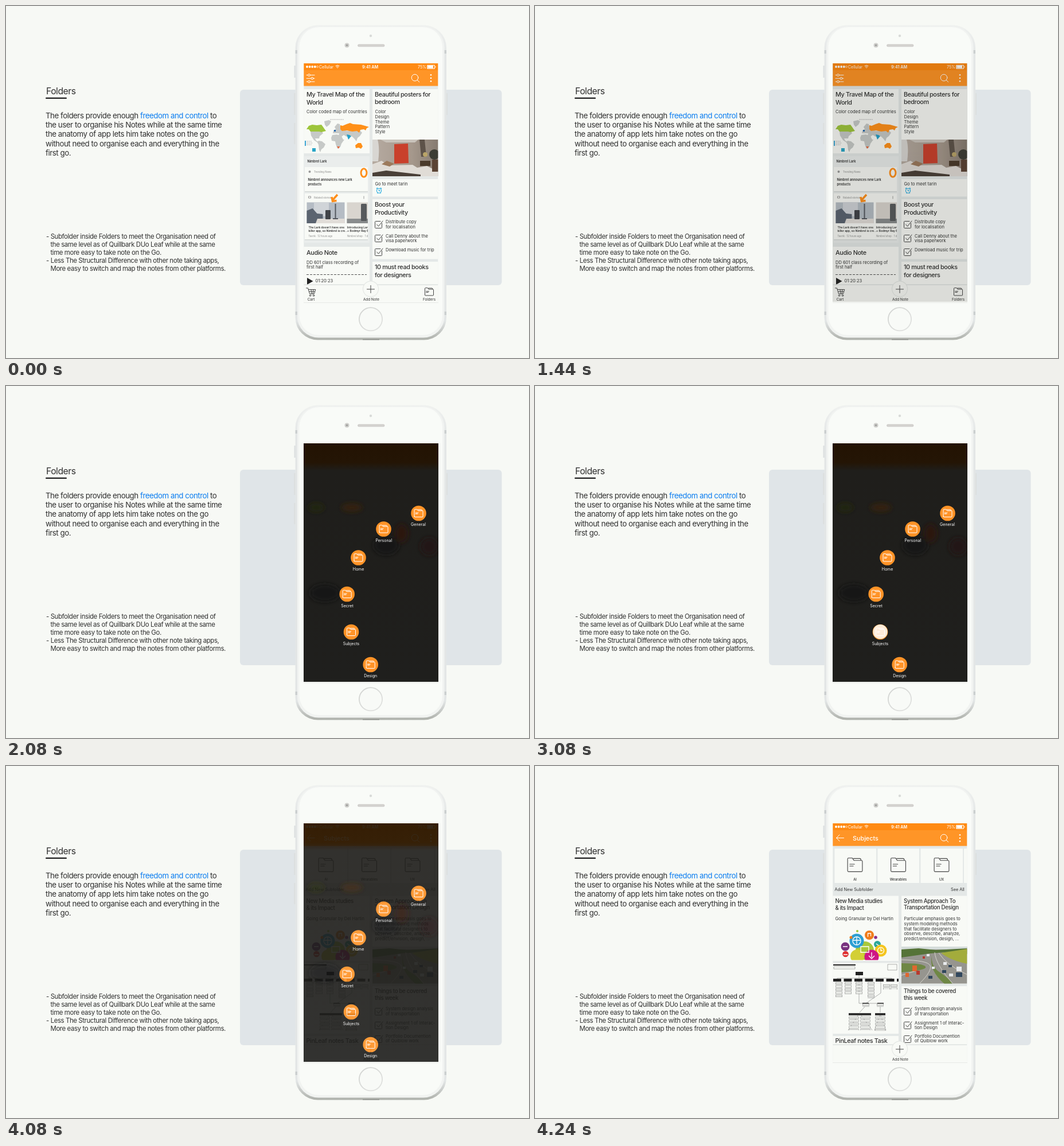
Recreate the animation shown at these times as an HTML page. Size 912 by 614 pixels, loop 4720 ms.

```html
<!DOCTYPE html>
<html lang="en">
<head>
<meta charset="utf-8">
<title>Folders</title>
<style>
  html, body { margin: 0; width: 100%; height: 100%; overflow: hidden; background: #f7f9f5; }
  svg { display: block; width: 912px; height: 614px; }
  text { font-family: Inter, Roboto, sans-serif; fill: #303030; white-space: pre; }
  .title { font-size: 15.7px; letter-spacing: -.03em; }
  .lead { font-size: 13.3px; letter-spacing: -.035em; }
  .points { font-size: 11.42px; letter-spacing: -.035em; }
  .h { font-size: 10.8px; font-weight: 500; letter-spacing: -.035em; }
  .h2 { font-size: 9.7px; font-weight: 500; letter-spacing: -.035em; }
  .s { font-size: 7.5px; }
  .xs { font-size: 6.3px; text-anchor: middle; }
  .sub { font-size: 5.8px; font-weight: 500; }
  .clip { font-size: 5.5px; font-weight: 600; }
  .small { font-size: 4.9px; }
  .tiny { font-size: 4.3px; fill: #888; }
  .white text, text.white { fill: #fff; }
  .label { font-size: 7px; text-anchor: middle; fill: #fff; }
  .card { fill: #f8faf6; }
  .line { fill: none; stroke: #444; stroke-width: 1; stroke-linecap: round; stroke-linejoin: round; }
  .line.white { stroke: #fff; }
  .big { stroke-width: .65; }

  .notes, .subjects, .dim, .menu, .tap { animation: 4720ms linear infinite; }
  .notes { animation-name: leave; }
  .subjects { animation-name: arrive; }
  .dim { animation-name: dim; }
  .menu { animation-name: menu; }
  .tap { fill: #fff; opacity: 0; }
  .tap.open { animation-name: tap-open; }
  .tap.pick { animation-name: tap-pick; }

  @keyframes leave { 0%, 85.592% { visibility: visible } 85.593%, 100% { visibility: hidden } }
  @keyframes arrive { 0%, 85.592% { visibility: hidden } 85.593%, 100% { visibility: visible } }
  @keyframes dim {
    0%, 29.661% { opacity: 0 }
    30.508% { opacity: .125 }
    32.203% { opacity: .81 }
    33.051% { opacity: 1 }
    85.593% { opacity: 1; animation-timing-function: ease-in-out }
    89.831%, 100% { opacity: 0 }
  }
  @keyframes menu {
    0%, 37.288% { opacity: 0; animation-timing-function: ease-in-out }
    44.068%, 100% { opacity: 1 }
  }
  @keyframes tap-open {
    0%, 8.473% { opacity: 0 }
    8.474%, 12.712% { opacity: .8 }
    24.576%, 100% { opacity: 0 }
  }
  @keyframes tap-pick {
    0%, 65.253% { opacity: 0 }
    65.254% { opacity: .82 }
    82.203%, 100% { opacity: 0 }
  }
</style>
</head>
<body>
<svg viewBox="0 0 912 614">
  <defs>
    <linearGradient id="shell" x2="0" y2="1">
      <stop offset="0" stop-color="#eff1ef"/><stop offset=".1" stop-color="#e3e6e6"/>
      <stop offset=".94" stop-color="#e3e6e6"/><stop offset="1" stop-color="#adb0aa"/>
    </linearGradient>
    <linearGradient id="ring" x2="1" y2="1">
      <stop offset="0" stop-color="#d0d2d0"/><stop offset="1" stop-color="#e2e3e1"/>
    </linearGradient>
    <linearGradient id="night" x2="0" y2="1">
      <stop offset="0" stop-color="#231303"/><stop offset=".08" stop-color="#241505"/>
      <stop offset=".115" stop-color="#1f1e1b"/><stop offset="1" stop-color="#1f1f1d"/>
    </linearGradient>
    <linearGradient id="wall" x2="1">
      <stop offset="0" stop-color="#b5aaa0"/><stop offset=".6" stop-color="#a5988c"/><stop offset="1" stop-color="#857a70"/>
    </linearGradient>
    <filter id="soft"><feGaussianBlur stdDeviation="4"/></filter>
    <clipPath id="screen"><path d="M519.3 100H753.3V516H519.3z"/></clipPath>
    <clipPath id="art"><path d="M519 270H634V338.500H519z"/></clipPath>
    <clipPath id="road"><path d="M639 315H754V379.500H639z"/></clipPath>
    <clipPath id="room"><path d="M639 233H754V297H639z"/></clipPath>
    <clipPath id="clipping"><path d="M521 327H631V408H521z"/></clipPath>

    <path id="folder" d="M-7.500 5.500V-5.800q0-1 1-1h3.700l1.800 2.400h7.500q1 0 1 1V5.500q0 1-1 1h-13q-1 0-1-1zM-1.500-6.300h6.500q1 0 1 1.500M-5.300-.800h4.800M-5.300 1h3.600"/>
    <g id="chip">
      <circle r="13.300" fill="#ff9327"/>
      <use href="#folder" class="line white"/>
    </g>
    <path id="check" class="line" d="M5.500-2V5.500q0 1-1 1H-5.500q-1 0-1-1V-4.500q0-1 1-1H3M-3.500 0L-.5 3.300 7-6"/>
    <path id="columns" d="M546 377v22M565 377v22M586 377v28M530 377v26M613 381v9M626 381v9M577 414v6M602 414v6"/>
    <path id="tables" d="M556 437v24M576 437v24M602 437v24"/>
    <g id="status">
      <path fill="#ff8a12" d="M519 100h235v12H519z"/>
      <path fill="#ff9527" d="M519 112h235v27.500H519z"/>
      <g fill="#fff">
        <circle cx="525" cy="106" r="1.900"/><circle cx="529.600" cy="106" r="1.900"/>
        <circle cx="534.200" cy="106" r="1.900"/><circle cx="538.800" cy="106" r="1.900"/>
        <circle cx="741" cy="120.300" r="1.300"/><circle cx="741" cy="125.800" r="1.300"/><circle cx="741" cy="131.300" r="1.300"/>
        <path d="M735.500 104h9.500v4.500h-9.500z"/>
      </g>
      <circle cx="543" cy="106" r="1.500" fill="none" stroke="#fff" stroke-width=".6"/>
      <g class="line white">
        <path d="M575 104.500q3-2.500 6 0M576.300 106.300q1.700-1.400 3.400 0M578 108v.2"/>
        <circle cx="713" cy="125" r="5.800"/><path d="M717.200 129.200l3.500 3.500M735 103.300h12.500v6H735zM749 105.500v1.500"/>
      </g>
      <g class="white">
        <text x="546" y="108.600" font-size="7">Cellular</text>
        <text x="621" y="108.600" font-size="7.200" font-weight="600">9:41 AM</text>
        <text x="718" y="108.600" font-size="7">75%</text>
      </g>
    </g>
    <g id="dock">
      <path fill="#dfe3e1" d="M519 485.500h235v1.500H519z"/>
      <path class="card" d="M519 487h235v30H519z"/>
      <circle cx="636" cy="493.500" r="14" fill="#e2e5e2"/>
      <circle cx="636" cy="493.500" r="13" class="card"/>
      <path class="line" d="M629.500 494h13M636 487.500v13"/>
      <text class="xs" x="637" y="514">Add Note</text>
    </g>
  </defs>

  <rect x="408" y="146" width="456.500" height="341" rx="6" fill="#e0e5e8"/>

  <text class="title" x="70" y="153.500">Folders</text>
  <path d="M70.300 160.700H104.700" stroke="#303030" stroke-width="2.600" stroke-linecap="round"/>
  <g class="lead">
    <text x="69" y="195.500">The folders provide enough <tspan fill="#0a7df0">freedom and control</tspan> to</text>
    <text x="69" y="212">the user to organise his Notes while at the same time</text>
    <text x="69" y="228.400">the anatomy of app lets him take notes on the go</text>
    <text x="69" y="244.800">without need to organise each and everything in the</text>
    <text x="69" y="261.200">first go.</text>
  </g>
  <g class="points">
    <text x="70" y="405.500">- Subfolder inside Folders to meet the Organisation need of</text>
    <text x="77.500" y="419.500">the same level as of Quillbark DUo Leaf while at the same</text>
    <text x="77.500" y="433.500">time more easy to take note on the Go.</text>
    <text x="70" y="447.500">- Less The Structural Difference with other note taking apps,</text>
    <text x="77.500" y="461.500">More easy to switch and map the notes from other platforms.</text>
  </g>

  <g id="phone">
    <path fill="#dcdfdf" d="M502.500 104h3v21h-3zM502 152h3.500v38H502zM502 204h3.500v37H502zM767 152h3v38h-3z"/>
    <rect x="504.500" y="33.500" width="263.500" height="549" rx="39" fill="url(#shell)"/>
    <path fill="#cbcfcf" d="M504.500 77h4v6h-4zM764 77h4v6h-4zM504.500 533h4v6h-4zM764 533h4v6h-4z"/>
    <rect x="508" y="35.500" width="256.500" height="543" rx="37" fill="#f1f3f1"/>
    <rect x="511.500" y="37" width="249.500" height="537" rx="34" fill="#f9fbf8"/>
    <path fill="#8f918d" d="M622 581h29v1.500h-29z"/>
    <circle cx="636" cy="52" r="2.200" fill="#d9dbd9"/>
    <circle cx="594.500" cy="68.500" r="4" fill="#cfcfcc"/><circle cx="594.500" cy="68.500" r="1.800" fill="#a0a09e"/>
    <rect x="613.500" y="67" width="46.500" height="3.800" rx="1.900" fill="#d5d3d0" stroke="#bfbdba" stroke-width=".6"/>
    <circle cx="636" cy="546.300" r="20.100" fill="#f8faf7" stroke="url(#ring)" stroke-width="1.800"/>
    <path d="M519 517.500H754" stroke="#e6e8e5"/>
  </g>

  <g clip-path="url(#screen)">
    <g class="notes">
      <path fill="#e4e8e7" d="M519 139h235v377H519z"/>
      <path class="card" d="M519 145h115v112H519zM519 420h115v70H519zM639 145h115v152H639zM639 302h115v30.500H639zM639 337h115v104.500H639zM639 446h115v44H639z"/>
      <use href="#status"/>
      <g class="line white">
        <path d="M524 120.500h2.500M530.500 120.500h7.500M524 126.300h8M536 126.300h2M524 132h2.500M530.500 132h7.500"/>
        <circle cx="528.500" cy="120.500" r="1.900"/><circle cx="534" cy="126.300" r="1.900"/><circle cx="528.500" cy="132" r="1.900"/>
      </g>

      <text class="h" x="524" y="158">My Travel Map of the</text>
      <text class="h" x="524" y="171.500">World</text>
      <text class="s" x="524" y="187">Color coded map of countries</text>
      <g id="world">
        <path fill="#c6c9c7" d="M531 219h20l2 3-6 5-1 4-7 0 2 4 4 2-2 1-6-4-5-8zM555 201l8-2 4 2-3 6-5 4-3-4zM545 235l6 1 6 5-3 6-4 3-2 5-2-4-1-9-2-4z"/>
        <path fill="#c6c9c7" d="M569 225l8-1 8 3 3 6 2 0-5 7-2 6-5 3-3-8-1-5-6-1-1-5zM570 222l1-5 4-2-2-4 5-6 4 1 2 9 12 3 20-2 5 5-4 6-4 3-2 6-4-5-3-3-5-2-5 2-5-3-4 3-5-2 1-4-5 0z"/>
        <path fill="#9dc53b" d="M528 209l6-2 8 1 8-1 3 4 2 3 3 4-8 2-4-1-15 0-3-4-4 0z"/>
        <path fill="#ff9019" d="M583 208l4 1 7-3 6-2 5 2 14 1 14 4-4 2-2 4-3-2-6 1-2 5-4-3-8 1-10-2-8 1-3-3zM609 243l5-4 5 0 3 6-3 4-4-2-5 1z"/>
        <path fill="#23a0c8" d="M594 224l5 1 3 2-5 6z"/>
        <path fill="#e8663a" d="M577 245l5 0-2 4z"/>
        <path fill="#2368b0" d="M572 216h3v3h-3z"/>
        <path fill="#3aa4d3" d="M521 235h2v9h-2z"/>
        <path stroke="#bbb" stroke-dasharray="3 .6" d="M524 236h9M524 239h11M524 242h9M565 198h24"/>
        <path fill="#29a5c7" d="M534 248h6v6h-6z"/>
      </g>

      <path fill="#eaedec" d="M519 262h115v151H519z"/>
      <path fill="#d5d9d7" d="M521 323h110v1.500H521zM521 407h110v1.500H521z"/>
      <path class="card" d="M521 281h110v42H521zM521 327h110v80H521z"/>
      <text class="clip" x="525.500" y="272.800">Nimbrel Lark</text>
      <circle cx="529.500" cy="289" r="2" fill="#999"/>
      <text class="tiny" x="537" y="290.500">Trending News</text>
      <text class="clip" x="526.500" y="304.800">Nimbrel announces new Lark</text>
      <text class="clip" x="526.500" y="312.500">products</text>
      <ellipse cx="624" cy="291" rx="5" ry="7.300" fill="none" stroke="#ff8f1c" stroke-width="3"/>
      <g clip-path="url(#clipping)">
        <path fill="none" stroke="#999" d="M527.500 332h4v3h-4zM624 331.500v5"/>
        <text class="tiny" x="537" y="335.500">Related stories</text>
        <path fill="#b5bcc4" d="M524.500 342.500H590.500V379H524.500z"/>
        <path fill="#d0d4d8" d="M537 342.500h26v24H537z"/>
        <path fill="#5b6470" d="M524.500 357l10-4 8 9 10 1v16h-28z"/>
        <path fill="#e1ddd8" d="M543 371h47.500v8H540z"/>
        <rect x="557" y="356" width="9" height="16" rx="1" fill="#414449"/>
        <path stroke="#54585f" stroke-width="2" d="M574.500 345v26M570 371h9"/>
        <path fill="#d9d5cf" d="M594.500 342.500H631V379H594.500z"/>
        <path fill="#898c8d" d="M594.500 371H631v8H594.500z"/>
        <rect x="619" y="345" width="10" height="30" rx="1.500" fill="#575a5d"/>
        <path d="M578 329l-8 9M568 333l1.500 7.500 7-1" fill="none" stroke="#ff8f1c" stroke-width="3.500"/>
        <text class="clip small" x="527.500" y="387.500">The Lark doesn't have one</text>
        <text class="clip small" x="527.500" y="394">killer app, so Nimbrel is cre...</text>
        <text class="clip small" x="595" y="387.500">Introducing Lark</text>
        <text class="clip small" x="595" y="394">+ Bodmyr Ray Bulb</text>
        <text class="tiny" x="527.500" y="403">Tavrik · 12 hours ago</text>
        <text class="tiny" x="595" y="403">Nimbrel shop · 1 d</text>
      </g>

      <text class="h" x="524" y="434">Audio Note</text>
      <text class="s" x="524" y="449.500">DD 601 class recording of</text>
      <text class="s" x="524" y="458">first half</text>
      <path d="M524 468.500H629" stroke="#555" stroke-dasharray="4 2"/>
      <path d="M525 474l10.500 6-10.500 6z" fill="#222"/>
      <text class="s" x="539.500" y="482">01:20:23</text>

      <text class="h" x="643" y="157.500">Beautiful posters for</text>
      <text class="h" x="643" y="171">bedroom</text>
      <g class="s">
        <text x="643.500" y="186.500">Color</text><text x="643.500" y="195.500">Design</text>
        <text x="643.500" y="204.500">Theme</text><text x="643.500" y="213.300">Pattern</text><text x="643.500" y="222.300">Style</text>
      </g>
      <g clip-path="url(#room)">
        <path fill="url(#wall)" d="M639 233h115v64H639z"/>
        <path fill="#d8d6d2" d="M639 233h9q4 14 1 38h-10z"/>
        <path fill="#c9c3bb" d="M653 233h66l-6 5h-50z"/>
        <path fill="#5d5249" d="M721 233h9l3 30h-9z"/>
        <path fill="#c9402c" d="M677 241l24-1 1 34-25 1z"/>
        <path fill="#e0dcd6" d="M639 276l16-6 12 8 42-1 8 5 17-3 20 10v8H639z"/>
        <path fill="#9c7a5c" d="M655 276l9-6 13 5-8 5z"/>
        <path fill="#4a4038" d="M639 291l24-4 60 7v3H639z"/>
        <path fill="#4a3a2a" d="M722 270h18v9h-18z"/>
        <circle cx="747" cy="259" r="9" fill="#3c3d34"/><circle cx="731" cy="259" r="4" fill="#b9a468"/>
        <path fill="#5a4334" d="M743 268h11v21h-11z"/>
      </g>
      <text class="s" x="643.500" y="312.500">Go to meet tarin</text>
      <g fill="none" stroke="#1ca6df" stroke-width="1.100">
        <circle cx="650.500" cy="322.300" r="4"/>
        <path d="M650.500 320v2.500h2M646 319l2-2M655 319l-2-2M647.500 327l1-1.500M653.500 327l-1-1.500"/>
      </g>

      <text class="h" x="643" y="350.300">Boost your</text>
      <text class="h" x="643" y="363.500">Productivity</text>
      <use href="#check" x="650" y="381"/><use href="#check" x="650" y="405"/><use href="#check" x="650" y="429"/>
      <g class="s">
        <text x="662" y="379.200">Distribute copy</text><text x="662" y="388">for localisation</text>
        <text x="662" y="403.500">Call Denny about the</text><text x="662" y="412.300">visa paperwork</text>
        <text x="662" y="427.500">Download music for trip</text>
      </g>
      <text class="h" x="643" y="459">10 must read books</text>
      <text class="h" x="643" y="472.500">for designers</text>

      <use href="#dock"/>
      <g class="line">
        <path d="M523.500 492h3l3 10h8l2.300-7.500h-12.500M528.500 498h10M532 494.500l1 7.500M536 494.500l-.8 7.500"/>
        <circle cx="530.500" cy="505" r="1.300"/><circle cx="536.500" cy="505" r="1.300"/>
        <use href="#folder" x="738" y="498.500"/>
      </g>
      <text class="xs" x="532" y="514">Cart</text>
      <text class="xs" x="738" y="514">Folders</text>
      <circle class="tap open" cx="737" cy="500.500" r="13.300"/>
    </g>

    <g class="subjects">
      <path fill="#e4e8e7" d="M519 139h235v377H519z"/>
      <path class="card" d="M522.500 144H595v60H522.500zM597.500 144H670v60H597.500zM672.500 144H746v60H672.500zM748 144h6v60H748zM519 226.500h115V340H519zM519 343.500h115V467H519zM519 471h115v20H519zM639 226.500h115V380H639zM639 384h115v107H639z"/>
      <use href="#status"/>
      <path class="line white" d="M538.500 125.500H525.500M531 120l-5.500 5.500 5.500 5.500"/>
      <text class="white" x="554" y="129.500" font-size="10.800" font-weight="500">Subjects</text>
      <g class="line big">
        <use href="#folder" transform="translate(558 172.700) scale(1.720 1.800)"/>
        <use href="#folder" transform="translate(633.500 172.700) scale(1.720 1.800)"/>
        <use href="#folder" transform="translate(709 172.700) scale(1.720 1.800)"/>
      </g>
      <text class="xs sub" x="558" y="199.500">AI</text>
      <text class="xs sub" x="633.500" y="199.500">Wearables</text>
      <text class="xs sub" x="709" y="199.500">UX</text>
      <text x="522.500" y="218" font-size="7.300">Add New Subfolder</text>
      <text x="725" y="218" font-size="7.300">See All</text>

      <text class="h2" x="523.500" y="239">New Media studies</text>
      <text class="h2" x="523.500" y="250.800">&amp; its Impact</text>
      <text class="s" x="523.500" y="269">Going Granular by Del Hartin</text>
      <g clip-path="url(#art)">
        <circle cx="575" cy="322" r="16" fill="#a9c93a"/><circle cx="562" cy="332" r="12" fill="#d3cf36"/>
        <circle cx="561" cy="305" r="12.500" fill="#2c9fd2"/><circle cx="583" cy="295" r="8" fill="#ef7c1c"/>
        <circle cx="541" cy="315" r="7.500" fill="#78327f"/><circle cx="541.500" cy="328" r="5.300" fill="#df3132"/>
        <circle cx="597" cy="311" r="6" fill="#2ba79a"/><circle cx="603" cy="322" r="10.500" fill="#f4c51f"/>
        <circle cx="587" cy="333" r="12.500" fill="#cf1685"/><circle cx="594" cy="299" r="2.800" fill="#8c2d87"/>
        <circle cx="562" cy="288" r="2" fill="#9dc53b"/><circle cx="551" cy="299" r="2.500" fill="#ef7c1c"/>
        <g fill="none" stroke="#fff" stroke-width="1.300">
          <circle cx="561" cy="305" r="7"/><path d="M554 304h14M561 298v14M580.500 298v-6h5v5M537 315h8M568 315h14v10h-14zM587 325v9M582 331l5 5 5-5M538 329h7"/>
          <circle cx="603" cy="322" r="5.500"/><path d="M603 318v4h3M595 310l4 3"/>
        </g>
      </g>

      <g id="chart">
        <path fill="#222" d="M520 346h39v2h-39zM559 359h13v6h-13z"/>
        <path fill="none" stroke="#666" stroke-width=".5" d="M521 350h37v4h-37zM615 346h16v10h-16zM565 365v5M527 373v-3h95v3M565 376v38h37M603 376v20l-26 18M575 420l-9 10M602 420v10M546 461l20-30 22 30M592 461l10-28 10 28z"/>
        <path stroke="#222" stroke-width="5" stroke-dasharray="14 4.500" d="M520 373.500h114"/>
        <g fill="none" stroke="#777" stroke-dasharray="4 1.500">
          <use href="#columns" stroke-width="12"/><use href="#tables" stroke-width="17"/>
        </g>
        <g fill="none" stroke="#eceeea" stroke-dasharray="3 2.500" stroke-dashoffset="-.5">
          <use href="#columns" stroke-width="11"/><use href="#tables" stroke-width="16"/>
        </g>
        <path fill="#333" d="M547 431h39v4h-39zM593 431h18v4h-18zM571 413h11v1.500h-11zM597 413h11v1.500h-11z"/>
      </g>
      <text class="h" x="523.500" y="482.500">PinLeaf notes Task</text>

      <text class="h2" x="643" y="238.500">System Approach To</text>
      <text class="h2" x="643" y="250.300">Transportation Design</text>
      <g class="s">
        <text x="643.500" y="268.500">Particular emphasis goes to</text>
        <text x="643.500" y="277.500">system modeling methods</text>
        <text x="643.500" y="286.500">that facilitate designers to</text>
        <text x="643.500" y="295.300">observe, describe, analyze,</text>
        <text x="643.500" y="304.200">predict/envision, design, ...</text>
      </g>
      <g clip-path="url(#road)">
        <path fill="#96958f" d="M639 315h115v65H639z"/>
        <path fill="#d5dcda" d="M639 315h115v5H639z"/>
        <path fill="#557338" d="M639 320l30-2 30 3 55-3v10l-40-3-26 2-49 7z"/>
        <path fill="#a3ac3c" d="M708 326l46-7v26q-30-6-46-19z"/>
        <path fill="#6f8745" d="M639 344q38 0 42 6t-42 10zM692 330q-2 20 14 30t22 20h-14q-28-24-22-50z"/>
        <path fill="none" stroke="#d5d3cc" d="M697 325q2 22 32 55M704 326q14 22 50 38M639 338q46 1 50 10t-18 31M639 365l26-8"/>
        <path fill="#e0672f" d="M658 348h8v10h-8zM646 361h6v7h-6z"/>
        <path fill="#b73a30" d="M665 357h6v7h-6zM676 332h4v4h-4z"/>
        <path fill="#e8ebed" d="M683 328h5v4h-5zM692 350h5v4h-5zM712 342h6v5h-6zM735 350h9v8h-9zM722 362h7v5h-7z"/>
        <path fill="#31475d" d="M734 360h11v8h-11zM710 356h7v5h-7zM686 366h7v5h-7zM721 347h6v4h-6z"/>
      </g>
      <text class="h2" x="643" y="396.300">Things to be covered</text>
      <text class="h2" x="643" y="408.300">this week</text>
      <use href="#check" x="650" y="428"/><use href="#check" x="650" y="452"/><use href="#check" x="650" y="476"/>
      <g class="s">
        <text x="662" y="425.800">System design analysis</text><text x="662" y="434.800">of transportation</text>
        <text x="662" y="450.500">Assignment 1 of Interac-</text><text x="662" y="459.300">tion Design</text>
        <text x="662" y="473.500">Portfolio Documention</text><text x="662" y="482.300">of Quiblow work</text>
      </g>
      <use href="#dock"/>
    </g>

    <g class="dim">
      <path fill="url(#night)" d="M519 100h235v416H519z"/>
      <g filter="url(#soft)">
        <ellipse cx="603" cy="212" rx="18" ry="7" fill="#35220c"/>
        <ellipse cx="541" cy="212" rx="13" ry="7" fill="#23260f"/>
        <ellipse cx="663" cy="278" rx="22" ry="16" fill="#141715"/>
        <ellipse cx="690" cy="257" rx="11" ry="16" fill="#2c1410"/>
        <ellipse cx="738" cy="280" rx="15" ry="15" fill="#231512"/>
        <ellipse cx="556" cy="361" rx="26" ry="15" fill="#151815"/>
      </g>
      <g class="menu">
        <use href="#chip" x="719.500" y="222"/><text class="label" x="719" y="244.300">General</text>
        <use href="#chip" x="658.500" y="249.500"/><text class="label" x="658.800" y="272">Personal</text>
        <use href="#chip" x="614.500" y="299.500"/><text class="label" x="614.500" y="322">Home</text>
        <use href="#chip" x="594.700" y="363"/><text class="label" x="595" y="385.500">Secret</text>
        <use href="#chip" x="602" y="429"/><text class="label" x="602" y="451.500">Subjects</text>
        <use href="#chip" x="635.700" y="486"/><text class="label" x="635.700" y="508.300">Design</text>
        <circle class="tap pick" cx="602" cy="428.700" r="12.600"/>
      </g>
    </g>
  </g>
</svg>
</body>
</html>
```
